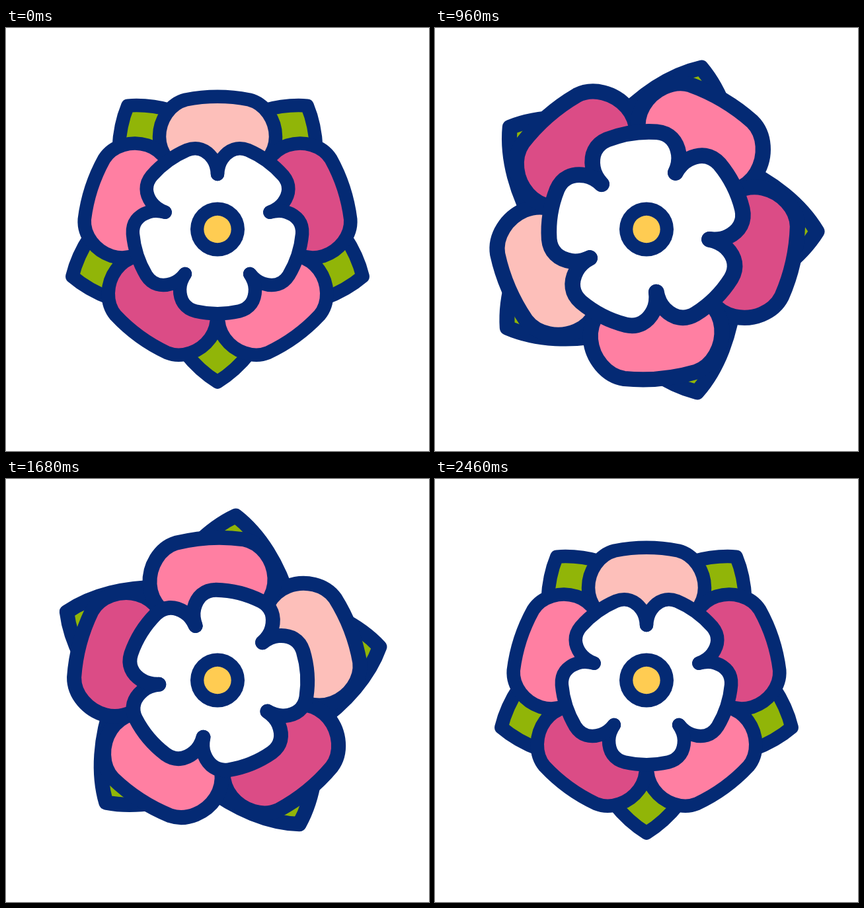
An HTML page with a canvas that plays this animation: 640 by 640 pixels, repeating every 3000 ms.

```html
<!DOCTYPE html>
<html lang="en">
<head>
<meta charset="utf-8">
<title>Turning rose</title>
<style>
  html, body { margin: 0; width: 100%; height: 100%; overflow: hidden; background: #fff; }
  canvas { display: block; }
</style>
</head>
<body>
<canvas id="stage" width="640" height="640"></canvas>
<script>
const ctx = document.getElementById('stage').getContext('2d');
const LOOP = 3000, CX = 320, CY = 304.5, LINE = 20.5, STEP = Math.PI * 2 / 5;
const NAVY = '#042a74', GREEN = '#91b508', PINK = '#ff7fa2', ROSE = '#db4c86', BLUSH = '#fdbfba';

// Each shape points up from the flower's centre.
const leaf = new Path2D('M0,0 L-88,-120 C-67,-170 -36,-209 0,-231 C36,-209 67,-170 88,-120 Z');
const petal = new Path2D('M-75,-105 C-84,-116 -88,-127 -88,-140 C-88,-165 -72,-190 -48,-196 ' +
  'C-17,-202 17,-202 48,-196 C72,-190 88,-165 88,-140 C88,-127 84,-116 75,-105');
const lobe = new Path2D('M-49,-67.5 C-54,-75 -57,-82 -57,-91 C-57,-108 -49,-120 -33,-124 ' +
  'C-11,-129 11,-129 33,-124 C49,-120 57,-108 57,-91 C57,-82 54,-75 49,-67.5');

// Layers from back to front; keys are [ms, degrees, scale].
const layers = [
  { shape: leaf, offset: 0.5, core: 100, colors: [GREEN], keys: [
    [140, 0, 1], [640, 29.3, 1.058], [960, 126.4, 1.117], [1140, 193.5, 1.142], [1240, 225.5, 1.148],
    [1440, 285.8, 1.126], [1780, 343, 1.063], [1940, 359, 1.026], [2240, 365, 1.003], [2460, 360, 1]] },
  { shape: petal, offset: 0, core: 110, colors: [BLUSH, ROSE, PINK, ROSE, PINK], keys: [
    [140, 0, 1], [640, -30.7, 1.063], [960, -113, 1.132], [1140, -167.6, 1.15],
    [1440, -246, 1.127], [1940, -327.3, 1.02], [2260, -363, 1.002], [2460, -360, 1]] },
  { shape: lobe, offset: 0.5, core: 85, colors: ['#fff'], keys: [
    [140, 0, 1], [640, -12.9, 1.073], [960, -44.8, 1.154], [1140, -53.2, 1.148],
    [1440, -47.5, 1.115], [1940, 4, 1.018], [2120, 6, 1.007], [2460, 0, 1]] }
];

function slope(keys, i, col) {
  if (i === 0 || i === keys.length - 1) return 0;
  const [a, b, c] = [keys[i - 1], keys[i], keys[i + 1]];
  const h0 = b[0] - a[0], h1 = c[0] - b[0];
  return ((b[col] - a[col]) / h0 * h1 + (c[col] - b[col]) / h1 * h0) / (h0 + h1);
}

// Smooth cubic interpolation through the keys.
function valueAt(keys, t, col) {
  const last = keys.length - 1;
  if (t <= keys[0][0]) return keys[0][col];
  if (t >= keys[last][0]) return keys[last][col];
  const i = keys.findIndex(k => k[0] > t) - 1;
  const a = keys[i], b = keys[i + 1], h = b[0] - a[0], u = (t - a[0]) / h;
  const blend = u * u * (3 - 2 * u);
  return a[col] + (b[col] - a[col]) * blend
    + h * u * (1 - u) * ((1 - u) * slope(keys, i, col) - u * slope(keys, i + 1, col));
}

function disc(radius, color) {
  ctx.fillStyle = color;
  ctx.beginPath();
  ctx.arc(0, 0, radius, 0, Math.PI * 2);
  ctx.fill();
}

function aroundCentre(offset, paint) {
  for (let i = 0; i < 5; i++) {
    ctx.save();
    ctx.rotate((i + offset) * STEP);
    paint(i);
    ctx.restore();
  }
}

function drawLayer({ shape, offset, core, colors, keys }, t) {
  const scale = valueAt(keys, t, 2);
  ctx.save();
  ctx.rotate(valueAt(keys, t, 1) * Math.PI / 180);
  ctx.scale(scale, scale);
  if (shape !== petal) disc(core, colors[0]);
  aroundCentre(offset, i => {
    ctx.fillStyle = colors[i % colors.length];
    if (shape === petal) {
      ctx.beginPath();
      ctx.moveTo(-75, -105);
      ctx.lineTo(0, -60);
      ctx.lineTo(75, -105);
      ctx.fill();
    }
    ctx.fill(shape);
  });
  aroundCentre(offset, () => ctx.stroke(shape));
  ctx.restore();
}

function draw(now) {
  const t = now % LOOP;
  ctx.setTransform(1, 0, 0, 1, 0, 0);
  ctx.fillStyle = '#fff';
  ctx.fillRect(0, 0, 640, 640);
  ctx.translate(CX, CY);
  ctx.lineWidth = LINE;
  ctx.lineCap = ctx.lineJoin = 'round';
  ctx.strokeStyle = NAVY;
  layers.forEach(layer => drawLayer(layer, t));
  disc(41, NAVY);
  disc(20.7, '#ffcc52');
}

const start = performance.now();
function tick() {
  draw(performance.now() - start);
  requestAnimationFrame(tick);
}
tick();
</script>
</body>
</html>
```
